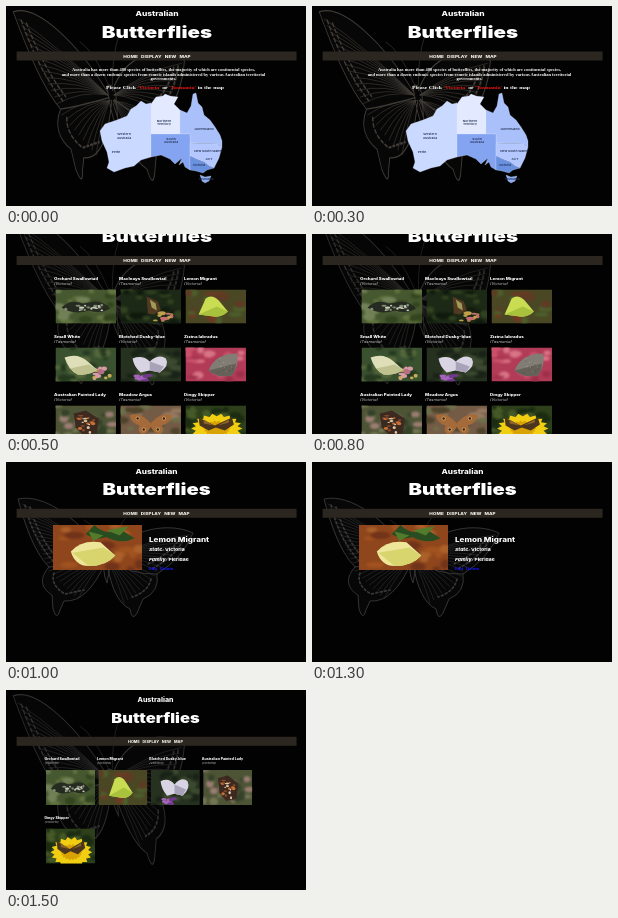
Recreate the animation shown at these times as an HTML page. Size 300x200 px, loop 2000 ms.

```html
<!DOCTYPE html>
<html lang="en">
<head>
<meta charset="utf-8">
<title>Australian Butterflies</title>
<style>
html, body { margin: 0; width: 100%; height: 100%; overflow: hidden; background: #020202; }
#stage { display: block; width: 100%; height: 100%; }
text { font-family: Inter, sans-serif; font-weight: 800; fill: #fff; }
.mid { text-anchor: middle; }
.title { font-weight: 900; }
.nav { fill: #f6f3ec; word-spacing: 2px; }
.state { font-weight: 400; font-style: italic; fill: #c4c4c4; }
.serif { font-family: "Liberation Serif", serif; font-weight: 700; }
.red { fill: #f01414; }
.link { fill: #1717ee; }
.map path { stroke: #dce6ff; stroke-width: .25; }
.map text { font-weight: 600; fill: #263252; }
.wings { stroke-linecap: round; fill: none; }
.foliage { filter: blur(1px); }
</style>
</head>
<body>
<svg id="stage" viewBox="0 0 300 200" preserveAspectRatio="none"></svg>
<script>
// The pages are shown slightly squashed, so all lettering is low and wide
const SQUASH = .8;
const text = (x, y, size, content, cls = "") =>
  `<text transform="translate(${x} ${y}) scale(1 ${SQUASH})" font-size="${size}" class="${cls}">${content}</text>`;
const shape = (fill, d) => `<path fill="${fill}" d="${d}"/>`;
const circle = (fill, x, y, r) => `<circle fill="${fill}" cx="${x}" cy="${y}" r="${r}"/>`;

// Seeded random numbers for foliage and wing speckles
function seeded(seed) {
  return () => (seed = seed * 16807 % 2147483647) / 2147483647;
}
function blobs(seed, colors, count, [x, y, w, h], size) {
  const rnd = seeded(seed * 7919);
  let out = "";
  for (let i = 0; i < count; i++)
    out += `<ellipse fill="${colors[i % colors.length]}" cx="${x + rnd() * w}" cy="${y + rnd() * h}" rx="${size * (.5 + rnd())}" ry="${size * (.3 + rnd() * .5)}"/>`;
  return out;
}
const foliage = (seed, base, ...colors) => `<rect width="60" height="34" fill="${base}"/>
  <g class="foliage">${blobs(seed, colors, 22, [0, 0, 60, 34], 5)}</g>`;

const openWings = "M30 18C23 9 14 7 9 10Q11 18 19 20Q16 27 22 29Q28 26 30 21Q32 26 38 29Q44 27 41 20Q49 18 51 10C46 7 37 9 30 18Z";
const flower = (fill, x, y, r) => shape(fill,
  Array.from({ length: 36 }, (_, i) => {
    const a = i * Math.PI / 18, d = i % 2 ? r * .82 : r;
    return (i ? "L" : "M") + (x + d * 1.7 * Math.cos(a)) + " " + (y + d * Math.sin(a));
  }).join("") + "Z");

const photos = {
  orchard: foliage(3, "#46582f", "#637440", "#33451f", "#728157") +
    shape("#252b20", "M6 18Q15 9 27 14L34 13Q47 10 54 19Q45 25 33 21Q18 26 6 18Z") +
    blobs(8, ["#c9cdbc", "#828b76"], 18, [10, 15, 39, 6], 1.8),
  macleay: foliage(5, "#1c2916", "#30421f", "#10190d") +
    blobs(12, ["#a87a4a", "#c76d72", "#c0a04a"], 12, [31, 22, 20, 9], 2.5) +
    shape("#513922", "M27 24L26 7L37 12L40 20L33 25Z") +
    shape("#9f9a55", "M29 10L35 14L36 21L31 18Z"),
  lemon: foliage(7, "#4a4824", "#5e3b25", "#4c602c", "#703923") +
    shape("#c9dc52", "M13 25L20 9Q26 4 33 11L42 22Q36 28 28 27Z") +
    shape("#a9c23e", "M13 25L31 17L42 22Q36 28 28 27Z"),
  lemonLarge: foliage(2, "#8f461c", "#a0521f", "#71331a", "#ab612a") +
    shape("#274d20", "M28 0Q36 9 45 3L55 10Q46 15 36 9Q30 12 22 7Z") +
    shape("#527c2c", "M36 4L51 1L45 8ZM24 5L34 8L27 12Z") +
    shape("#eee79a", "M12 20Q19 11 32 13L42 23Q36 31 24 31Q15 31 12 20Z") +
    shape("#d8d56e", "M13 21L34 17L42 23Q36 31 24 31Z"),
  white: foliage(11, "#3a5130", "#56683b", "#25391f") +
    blobs(4, ["#d99aa8", "#c5ab53", "#b46f84"], 14, [35, 20, 20, 11], 3) +
    shape("#dedfb8", "M9 10Q22 5 32 14L41 22Q35 28 22 27Q13 23 9 10Z") +
    shape("#bfc28e", "M14 21L33 17L41 22Q35 28 22 27Z"),
  dusky: foliage(13, "#26321f", "#3c4a30", "#192217") +
    blobs(9, ["#a364ba", "#70388a"], 9, [14, 24, 16, 9], 3) +
    shape("#d9d4e4", "M12 11Q22 7 29 14Q38 6 45 11Q49 18 39 25L29 23L20 25Q13 19 12 11Z") +
    shape("#a8a3b9", "M29 14L29 23L39 25L43 19Z"),
  zizina: foliage(17, "#b23b57", "#cb526b", "#9c304b", "#d77485") +
    shape("#817c74", "M23 23Q29 6 51 6Q54 17 46 28Q31 31 23 23Z") +
    shape("#656159", "M23 23L50 16Q50 23 46 28Q31 31 23 23Z") +
    blobs(6, ["#4f4b45", "#aba69c"], 14, [31, 10, 16, 15], .7),
  painted: foliage(19, "#4d5436", "#747653", "#344229", "#9b7d72") +
    shape("#3c2920", "M18 8L30 5L43 13L41 28L28 30L20 22Z") +
    blobs(10, ["#c77036", "#8c4a2a", "#dfc7a1"], 20, [22, 10, 16, 17], 1.9),
  meadow: foliage(23, "#745b46", "#967a61", "#4d442b", "#6d704a") +
    shape("#a56a39", openWings) +
    [[17, 13], [43, 13], [23, 24], [37, 24]].map(([x, y]) =>
      circle("#dda862", x, y, 2) + circle("#291f1a", x, y, 1.2)).join(""),
  skipper: foliage(29, "#2d401b", "#465a28", "#1b2c12") +
    flower("#f2ce13", 31, 23, 15) + flower("#d8a205", 31, 23, 8) +
    shape("#4b351c", "M29 20L13 12L14 20L23 25L30 22L39 25L48 19L46 12Z") +
    shape("#8a642d", "M28 20L18 14L18 18ZM32 20L43 14L43 17Z")
};

const photo = (name, x, y, w, h) =>
  `<svg x="${x}" y="${y}" width="${w}" height="${h}" viewBox="0 0 60 34" preserveAspectRatio="none">${photos[name]}</svg>`;

const wingPaths = [
  "M98 94C76 59 39 31 12 37C18 59 27 89 43 105Q65 103 98 97",
  "M43 105C32 117 36 127 46 133L47 147Q51 160 54 148L58 139Q82 141 100 99",
  "M103 92C125 66 164 60 187 71Q177 96 151 112Q125 113 103 98",
  "M151 112Q154 130 137 137L131 151Q126 160 124 147Q107 139 101 101",
  "M98 89Q104 86 106 94L101 121Q96 111 98 89"
].join("");

// Veins fan out from the body toward each wing margin
const fan = (x, y, x1, y1, x2, y2, n) => Array.from({ length: n }, (_, i) => {
  const t = i / (n - 1), ex = x1 + (x2 - x1) * t, ey = y1 + (y2 - y1) * t;
  return `M${x} ${y}Q${(x + ex) / 2} ${(y + ey) / 2 - 6} ${ex} ${ey}`;
}).join("");
const veins = fan(97, 95, 16, 42, 41, 101, 14) + fan(98, 99, 43, 109, 72, 137, 9) +
  fan(104, 95, 183, 73, 151, 109, 10) + fan(102, 99, 149, 114, 118, 141, 9) +
  "M100 88Q91 64 78 58M104 88Q110 67 121 54";
const margin = "M19 43Q27 77 47 99M24 45Q33 76 51 96M48 111Q44 123 59 132L78 128M179 75Q170 94 147 106M174 76Q164 92 142 102M145 117Q142 130 126 135";

const wings = (transform, color, opacity) =>
  `<g class="wings" transform="${transform}" stroke="${color}" opacity="${opacity}">
    <path d="${wingPaths}" stroke-width=".9" fill="${color}" fill-opacity=".1"/><path d="${veins}" stroke-width=".5"/>
    <path d="${margin}" stroke-width="1.6" stroke-dasharray="2 2.4"/></g>`;
const bigWings = dy => `matrix(.925 0 .274 1.43 -14 ${dy - 47})`;

function header(dy, titleSize, smallSize, navSize, x = 151) {
  return text(x, 10.3 + dy, smallSize, "Australian", "mid") +
    text(x, 31.8 + dy, titleSize, "Butterflies", "mid title") +
    `<rect x="10.6" y="${45.5 + dy}" width="280" height="9" fill="#2b2720"/>` +
    text(x, 51.6 + dy, navSize, "HOME DISPLAY NEW MAP", "mid nav");
}

function card(x, y, [name, state, image], size, w, h, gap) {
  return text(x, y, size, name) + text(x, y + size * 1.15, size * .92, `(${state})`, "state") +
    photo(image, x + 1.5, y + gap, w, h);
}

const species = [
  ["Orchard Swallowtail", "Victoria", "orchard"],
  ["Macleays Swallowtail", "Tasmania", "macleay"],
  ["Lemon Migrant", "Victoria", "lemon"],
  ["Small White", "Tasmania", "white"],
  ["Blotched Dusky-blue", "Victoria", "dusky"],
  ["Zizina labradus", "Tasmania", "zizina"],
  ["Australian Painted Lady", "Victoria", "painted"],
  ["Meadow Argus", "Tasmania", "meadow"],
  ["Dingy Skipper", "Victoria", "skipper"]
];

const regions = [
  ["#cad9ff", "M145 97L140 98L135 95L130 100L125 103L121 110L111 114L99 118L94 125L96 135L101 146L103 156L101 162L108 166L119 162L128 160L135 154L145 151Z"],
  ["#e3eaff", "M145 98L150 91L157 90L159 88L164 90L172 91L168 98L174 104V128H145Z"],
  ["#a9c0fb", "M174 104L181 107L185 100L187 88L190 87L192 97L196 101L198 109L204 114L209 121L214 129L216 135V141L212 138L184 137V128H174Z"],
  ["#84a4f2", "M145 128H184V164L179 161L177 156L173 159L176 152L169 158L164 153L155 149L145 151Z"],
  ["#b4c8ff", "M184 137L212 138L216 141L213 152L208 162L203 160L198 156L190 153L184 150Z"],
  ["#6a90e0", "M184 150L190 153L198 156L203 160L208 162L201 164L197 167L190 165L184 164Z"],
  ["#8babf4", "M194 169L199 171L205 170L203 175L199 177L196 175Z"]
];
const places = [
  [118, 129, "Western"], [118, 132.5, "Australia"], [110, 147, "Perth"],
  [158, 115.5, "Northern"], [158, 119, "Territory"], [198, 124, "Queensland"],
  [165, 133.5, "South"], [165, 137, "Australia"], [202, 145.5, "New South Wales"],
  [203, 154, "ACT"], [193, 159.5, "Victoria"], [200, 174, "Tasmania"]
];

const home = wings(bigWings(0), "#8a8175", .45) + header(0, 20.6, 8.4, 4.8) +
  text(157.5, 65.4, 4.5, "Australia has more than 400 species of butterflies, the majority of which are continental species,", "mid serif") +
  text(157.5, 70, 4.5, "and more than a dozen endemic species from remote islands administered by various Australian territorial", "mid serif") +
  text(157.5, 74.3, 4.5, "governments.", "mid serif") +
  text(159, 83, 5.8, `Please Click <tspan class="red">'Victoria'</tspan> or <tspan class="red">'Tasmania'</tspan> in the map`, "mid serif") +
  `<g class="map">${regions.map(r => shape(...r)).join("")}${places.map(([x, y, name]) => text(x, y, 3.3, name, "mid")).join("")}</g>`;

const display = wings(bigWings(-23.5), "#8a867e", .32) + header(-23.5, 20.6, 8.4, 4.8) +
  species.map((s, i) => card(48 + i % 3 * 65, 45.5 + Math.floor(i / 3) * 58, s, 4.45, 60.5, 34, 10)).join("");

const detail = wings("", "#7c7c7c", .45) + header(1.3, 20.2, 8.2, 4.7, 150.5) +
  photo("lemonLarge", 47, 63, 89, 45) + text(143, 80, 8.1, "Lemon Migrant") +
  text(143, 89.3, 5, '<tspan font-style="italic">State:</tspan> Victoria') +
  text(143, 98.7, 5, '<tspan font-style="italic">Family:</tspan> Pieridae') +
  text(143, 107.8, 4.2, "Edit", "link") + text(154, 107.8, 4.2, "Delete", "link");

const filtered = wings(bigWings(0), "#808080", .35) + header(1.3, 16.5, 7, 3.8, 149.5) +
  species.filter(s => s[1] === "Victoria").map((s, i) =>
    card(38.5 + i % 4 * 52.4, 70 + Math.floor(i / 4) * 58.5, s, 3.55, 49, 35, 10)).join("");

const stage = document.getElementById("stage");
stage.innerHTML = [home, display, detail, filtered].map(page => `<g>${page}</g>`).join("");
const pages = [...stage.children];

function draw(now) {
  const current = Math.floor(now % 2000 / 500);
  pages.forEach((page, i) => page.style.display = i === current ? "" : "none");
}
const start = performance.now();
function tick() {
  draw(performance.now() - start);
  requestAnimationFrame(tick);
}
tick();
</script>
</body>
</html>
```
